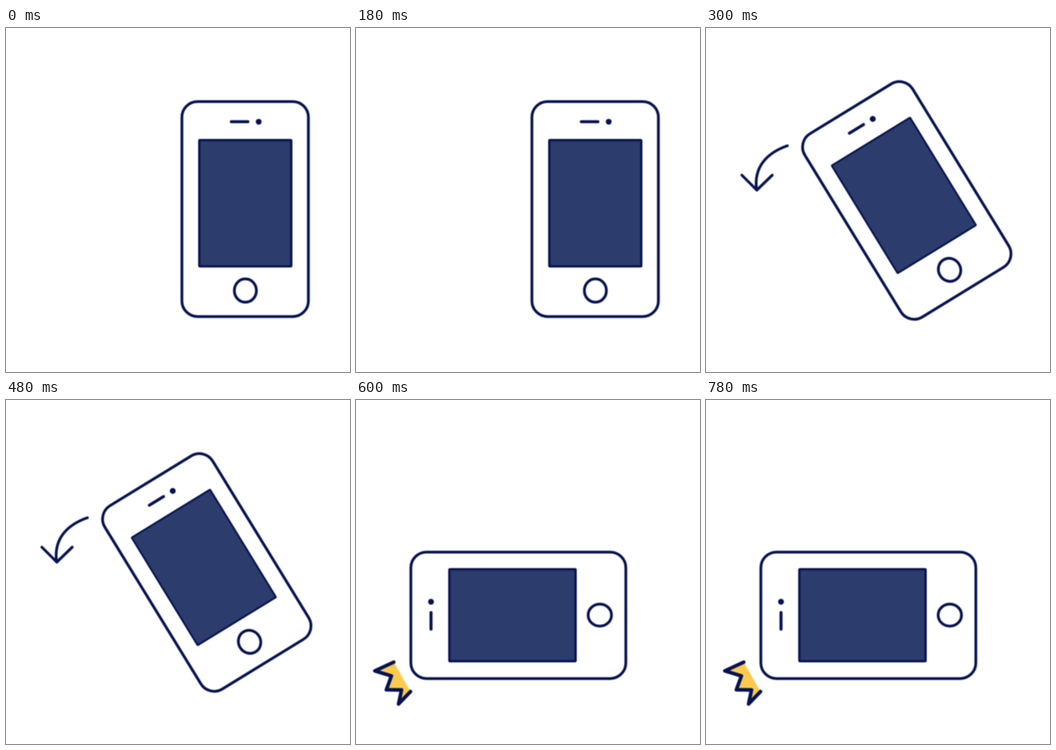
Recreate the animation shown at these times as an HTML page with a canvas. Size 748 by 748 pixels, loop 900 ms.

```html
<!DOCTYPE html>
<html lang="en">
<head>
<meta charset="utf-8">
<title>Turn your phone</title>
<style>
  html, body { margin: 0; width: 100%; height: 100%; overflow: hidden; background: #fff; }
  /* a slight blur gives the lines their soft edges */
  canvas { display: block; width: 100vmin; height: 100vmin; filter: blur(0.9px); }
</style>
</head>
<body>
<canvas id="stage" width="748" height="748"></canvas>
<script>
const SIZE = 748, STEP = 300;
const INK = '#05124f', SCREEN = '#2c3c6c', YELLOW = '#fdca4f';
const ctx = document.getElementById('stage').getContext('2d');

const poses = [
  { x: 520, y: 393.7, angle: 0, rim: 5 },
  { x: 436.6, y: 375, angle: -31.5, rim: 4, extra: drawArrow },
  { x: 353, y: 468.2, angle: -90, rim: 5, extra: drawBolt }
];

function stroke(width) {
  ctx.lineWidth = width;
  ctx.stroke();
}

function line(points) {
  ctx.beginPath();
  points.forEach(([x, y]) => ctx.lineTo(x, y));
}

// Drawn upright around the middle of the body.
function drawPhone({ x, y, angle, rim }) {
  ctx.save();
  ctx.translate(x, y);
  ctx.rotate(angle * Math.PI / 180);

  ctx.beginPath();
  ctx.roundRect(-137.5, -233.7, 275, 467.4, 34);
  stroke(6);

  ctx.beginPath();
  ctx.roundRect(-99.7, -150, 200, 274.5, 1.5);
  ctx.fillStyle = SCREEN;
  ctx.fill();
  stroke(rim);

  line([[-30, -189.9], [6, -189.9]]);
  stroke(6.6);

  ctx.beginPath();
  ctx.arc(29.5, -189.9, 6.4, 0, Math.PI * 2);
  ctx.fillStyle = INK;
  ctx.fill();

  ctx.beginPath();
  ctx.ellipse(0.5, 177.2, 24, 25.4, 0, 0, Math.PI * 2);
  stroke(6);
  ctx.restore();
}

function drawArrow() {
  ctx.beginPath();
  ctx.moveTo(177, 256);
  ctx.bezierCurveTo(134, 271, 103, 301, 110, 352);
  stroke(6);
  line([[78, 320], [110.5, 352.5], [144, 320]]);
  stroke(6);
}

function drawBolt() {
  line([[82, 570], [41, 589], [77, 600], [66, 630], [99, 630.5], [92.5, 661], [118.5, 634]]);
  ctx.fillStyle = YELLOW;
  ctx.fill();
  stroke(7.8);
}

function frame(now) {
  const pose = poses[Math.floor(now / STEP) % poses.length];
  ctx.fillStyle = '#fff';
  ctx.fillRect(0, 0, SIZE, SIZE);
  ctx.strokeStyle = INK;
  ctx.lineCap = ctx.lineJoin = 'round';
  drawPhone(pose);
  if (pose.extra) pose.extra();
}

let start;
function tick(now) {
  start ??= now;
  frame(now - start);
  requestAnimationFrame(tick);
}
frame(0);
requestAnimationFrame(tick);
</script>
</body>
</html>
```
